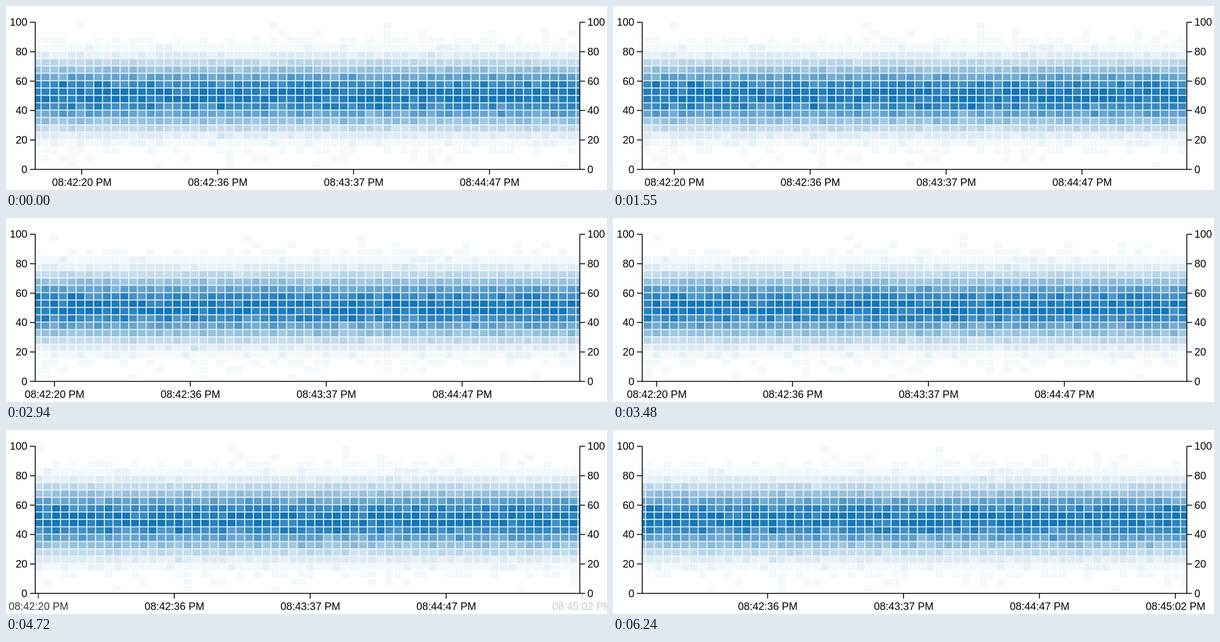
Recreate the animation shown at these times as an HTML page with a canvas. Size 1028 by 317 pixels, loop 6310 ms.

```html
<!DOCTYPE html>
<html lang="en">
<head>
<meta charset="utf-8">
<title>Scrolling heatmap</title>
<style>
  html, body { margin: 0; width: 1028px; height: 317px; overflow: hidden; background: #fff; }
  canvas, svg { position: absolute; left: 0; top: 0; }
  text { font: 18px "Liberation Sans", Arial, sans-serif; }
  path { stroke: #000; stroke-width: 1.5; fill: none; }
</style>
</head>
<body>
<canvas id="cells" width="1028" height="317"></canvas>
<svg id="axes" width="1028" height="317"></svg>
<script>
const LOOP = 6310, STEP = 88.3, LAST_STEP = 71;
const TICK_SHIFT = 1.374;                 // px per step
const COLUMN = 15, UNIT = 15.5;           // cell pitch, axis travel per new column
const ROWS = 20, COLS = 71, GAP = 1.5;
const TOP = 28, BOTTOM = 281.5, LEFT = 50, RIGHT = 981.5;
const ROW_H = (BOTTOM - TOP) / ROWS;
const SPREAD = 13.8, FULL_COUNT = 20;     // bell curve width, samples in a solid cell

const clamp = x => Math.max(0, Math.min(1, x));

let seed = 7;
function random() {
  seed = (seed * 1664525 + 1013904223) % 4294967296;
  return seed / 4294967296;
}

// Each column is a histogram of normally distributed samples around 50
function cellLevel(row) {
  const distance = (row + .5) * 100 / ROWS - 50;
  const mean = Math.exp(-(distance ** 2) / (2 * SPREAD ** 2));
  const wobble = 1 + .2 * (random() + random() - 1);
  return clamp(Math.floor(FULL_COUNT * mean * wobble + random()) / FULL_COUNT);
}
const levels = Array.from({ length: COLS }, () => Array.from({ length: ROWS }, (_, row) => cellLevel(row)));

const svg = document.getElementById('axes');
function add(parent, name, attrs, text = '') {
  const node = document.createElementNS('http://www.w3.org/2000/svg', name);
  for (const key in attrs) node.setAttribute(key, attrs[key]);
  node.textContent = text;
  return parent.appendChild(node);
}

add(svg, 'path', { d: `M${LEFT} ${TOP}V${BOTTOM}H${RIGHT}V${TOP}` });
for (let value = 0; value <= 100; value += 20) {
  const y = BOTTOM - value / 100 * (BOTTOM - TOP);
  add(svg, 'path', { d: `M${LEFT - 9} ${y}h9M${RIGHT} ${y}h9` });
  add(svg, 'text', { x: 36.5, y: y + 6.2, 'text-anchor': 'end' }, value);
  add(svg, 'text', { x: 994.5, y: y + 6.2 }, value);
}

const times = ['08:42:20', '08:42:36', '08:43:37', '08:44:47', '08:45:02'];
const ticks = times.map(time => {
  const group = add(svg, 'g', {});
  add(group, 'path', { d: `M0 ${BOTTOM}v9` });
  add(group, 'text', { x: .3, y: 310, 'text-anchor': 'middle' }, time + ' PM');
  return group;
});

const ctx = document.getElementById('cells').getContext('2d');
ctx.beginPath();
ctx.rect(LEFT, 0, RIGHT - LEFT, BOTTOM);
ctx.clip();
ctx.fillStyle = '#1676b6';

function draw(ms) {
  const step = ms < 60 ? 0 : Math.min(LAST_STEP, 1 + Math.floor((ms - 60) / STEP + .4));
  const travel = step * TICK_SHIFT;
  const fade = clamp(travel / UNIT - 4.58);

  ctx.clearRect(0, 0, 1028, 317);
  levels.forEach((column, i) => {
    const x = 45.8 + (i - travel / UNIT) * COLUMN;
    column.forEach((level, row) => {
      ctx.globalAlpha = level;
      ctx.fillRect(x, BOTTOM - (row + 1) * ROW_H, COLUMN - GAP, ROW_H - GAP);
    });
  });

  ticks.forEach((tick, i) => {
    tick.setAttribute('transform', `translate(${129.5 + i * 15 * UNIT - travel} 0)`);
    tick.setAttribute('opacity', i === 0 ? 1 - fade : i === times.length - 1 ? fade : 1);
  });
}

const start = performance.now();
function frame() {
  draw((performance.now() - start) % LOOP);
  requestAnimationFrame(frame);
}
frame();
</script>
</body>
</html>
```
